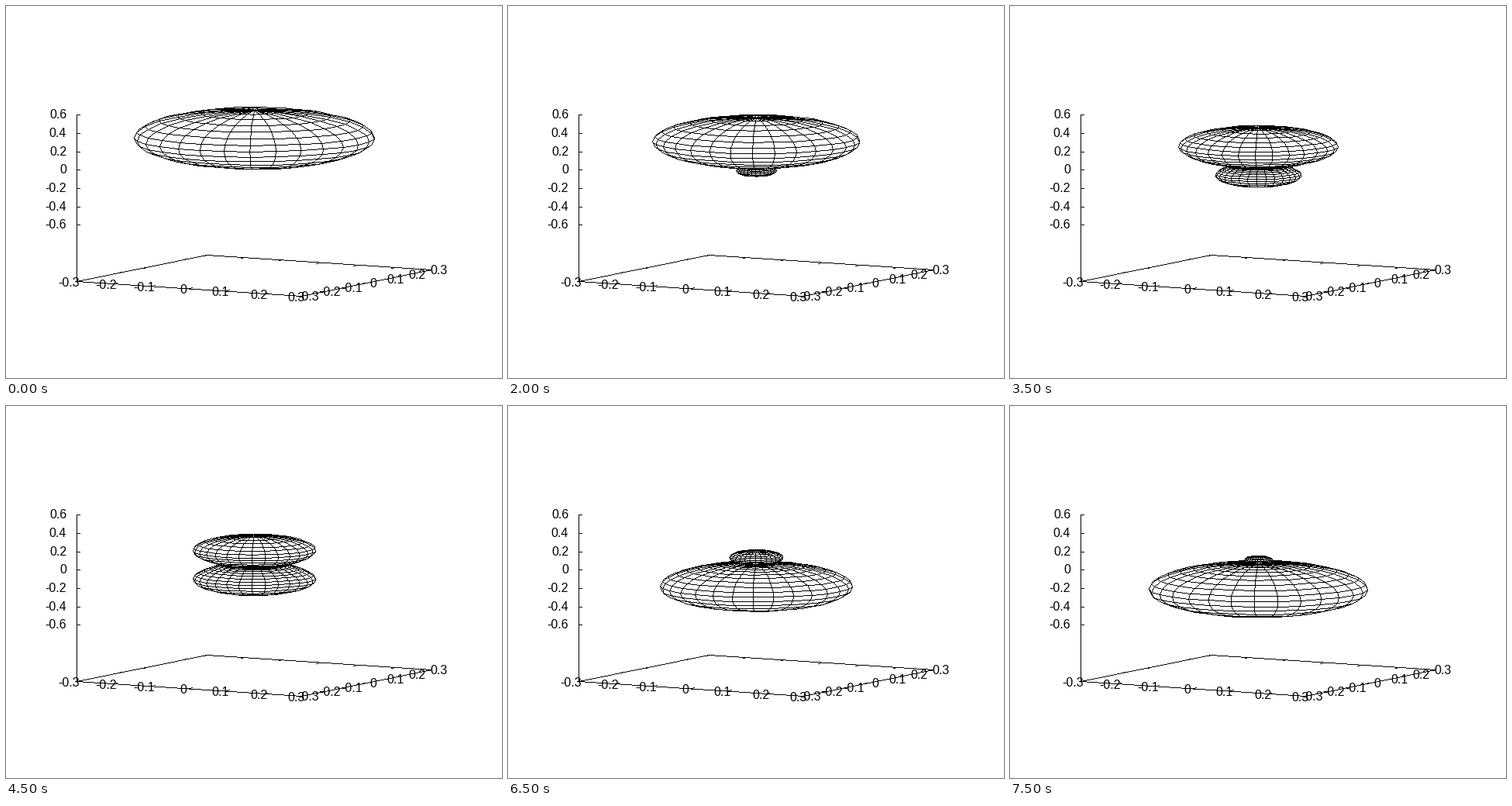
These frames come from a looping animation (640x480 px, 8 s). A matplotlib script:

```python
import numpy as np
import matplotlib.pyplot as plt
from matplotlib.animation import FuncAnimation

W, H, DPI = 640, 480, 100
FRAMES, INTERVAL = 16, 500
CX, CY, BASE_Y = 320, 204.35, 347.4   # screen position of z = 0 and of the floor
SCALE, TILT, ZSCALE = 560, 64.7, 118.3
C, S = np.cos(np.pi / 6), np.sin(np.pi / 6)
N = 30

fig = plt.figure(figsize=(W / DPI, H / DPI), dpi=DPI, facecolor="white")
ax = fig.add_axes([0, 0, 1, 1])
ax.set_xlim(0, W)
ax.set_ylim(H, 0)
ax.axis("off")


def project(x, y, z=0.0, cy=CY):
    """Orthographic view in whole pixels."""
    sx = CX + SCALE * (C * x + S * y)
    sy = cy + TILT * (S * x - C * y) - ZSCALE * z
    return np.floor(np.stack([sx, sy], axis=-1) + 0.5).astype(int)


def floor_point(x, y):
    return project(x, y, cy=BASE_Y)


def draw_line(img, p, q):
    """Hard one-pixel line, the same pixels in either direction."""
    (x0, y0), (x1, y1) = sorted([tuple(p), tuple(q)])
    n = max(x1 - x0, abs(y1 - y0), 1)
    t = np.arange(n + 1) / n
    img[np.floor(y0 + (y1 - y0) * t + 0.5).astype(int),
        np.floor(x0 + (x1 - x0) * t + 0.5).astype(int)] = 0


def draw_face(img, quad):
    """White convex face with a black outline; hides what lies behind it."""
    (xa, ya), (xb, yb) = quad.min(axis=0), quad.max(axis=0)
    gy, gx = np.mgrid[ya:yb + 1, xa:xb + 1]
    edges = list(zip(quad, np.roll(quad, -1, axis=0)))
    inside = np.ones(gx.shape, bool)
    for p, q in edges:
        inside &= (q[0] - p[0]) * (gy - p[1]) <= (q[1] - p[1]) * (gx - p[0])
    img[ya:yb + 1, xa:xb + 1][inside] = 255
    for p, q in edges:
        draw_line(img, p, q)


def label(x, y, value, ha="center"):
    ax.text(x, y + 5, f"{value:g}", ha=ha, va="baseline", color="black",
            family="Liberation Sans", size=16 * 72 / DPI, zorder=3)


def draw_axes(img):
    a = 0.3
    corners = [floor_point(*p) for p in ((-a, -a), (a, -a), (a, a), (-a, a))]
    lines = list(zip(corners, corners[1:] + corners[:1]))
    x_tick, y_tick = np.array([4, 0]), np.array([4, -1])

    for k in range(-3, 4):
        v = k / 10
        front, back = floor_point(v, -a), floor_point(v, a)
        right, left = floor_point(a, v), floor_point(-a, v)
        lines += [(front, front + y_tick), (back, back - y_tick),
                  (right, right - x_tick), (left, left + x_tick)]
        label(front[0] - (9.7 if k < 0 else 7), front[1] + 1.7, v)
        label(right[0] + 9, right[1] + 0.8, v)

    for k in range(-3, 4):
        p = project(-a, -a, k / 5)
        lines.append((p, p + x_tick))
        label(78.2, p[1], k / 5, ha="right")
    lines.append((corners[0], project(-a, -a, 0.6)))

    for p, q in lines:
        draw_line(img, p, q)


theta = np.linspace(0, np.pi, N)[:, None]
phi = np.linspace(0, 2 * np.pi, N)[None, :]


def quads(grid):
    cells = [grid[:-1, :-1], grid[1:, :-1], grid[1:, 1:], grid[:-1, 1:]]
    return np.stack(cells, axis=2).reshape((-1, 4) + grid.shape[2:])


def surface(t):
    """Density of an equal mix of the l=0 and l=1 states, front faces back to front."""
    c = np.cos(theta)
    r = (1 + 3 * c**2 + 2 * np.sqrt(3) * c * np.cos(t)) / (4 * np.pi)
    x = r * np.sin(theta) * np.cos(phi)
    y = r * np.sin(theta) * np.sin(phi)
    z = r * c + 0 * phi
    exact = quads(np.stack([SCALE * (C * x + S * y),
                            TILT * (S * x - C * y) - ZSCALE * z], axis=-1))
    d1, d2 = exact[:, 2] - exact[:, 0], exact[:, 3] - exact[:, 1]
    facing = d1[:, 0] * d2[:, 1] - d1[:, 1] * d2[:, 0] < 0
    depth = quads(0.9933 * (S * x - C * y) + 0.0246 * z).mean(axis=1)
    order = np.argsort(depth)
    return quads(project(x, y, z))[order[facing[order]]]


backdrop = np.full((H, W), 255, np.uint8)
draw_axes(backdrop)
canvas = ax.imshow(backdrop, cmap="gray", vmin=0, vmax=255, extent=(0, W, H, 0),
                   interpolation="nearest", aspect="auto")


def update(i):
    img = backdrop.copy()
    for quad in surface(np.pi * (i + 1) / 20):
        draw_face(img, quad)
    canvas.set_data(img)
    return (canvas,)


anim = FuncAnimation(fig, update, frames=FRAMES, interval=INTERVAL,
                     repeat=True, repeat_delay=0, blit=False)
plt.show()
```
